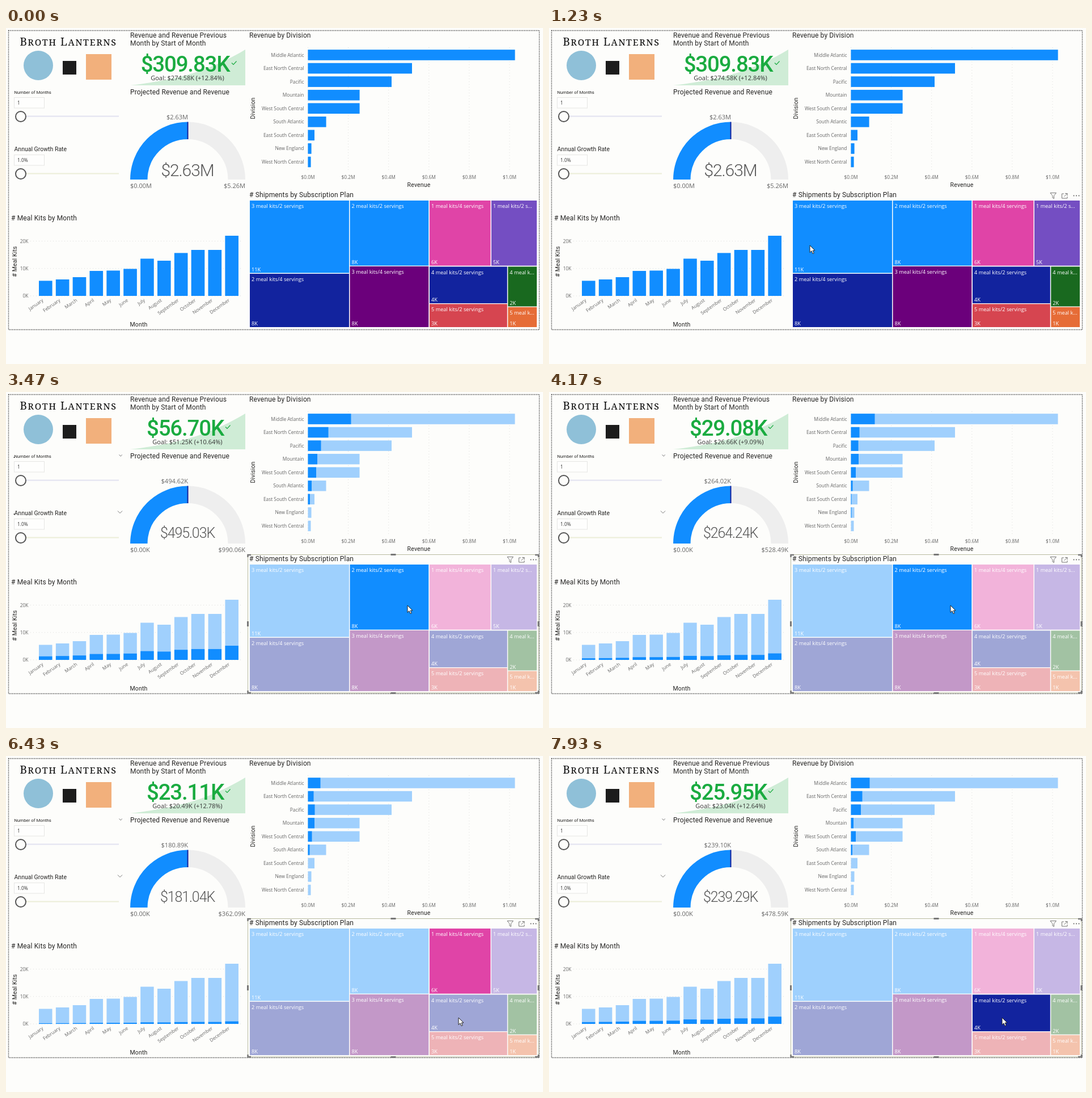
Recreate the animation shown at these times as an HTML page. Size 947 by 592 pixels, loop 8 s.

```html
<!DOCTYPE html>
<html lang="en">
<head>
<meta charset="utf-8">
<title>Meal kit dashboard</title>
<style>
  html, body { margin: 0; width: 100%; height: 100%; overflow: hidden; background: #fdfdfb; }
  svg { display: block; width: 100%; height: 100%; }
  text { font-family: "Open Sans", "Noto Sans", sans-serif; font-size: 8.4px; fill: #666; }
  .title, .axis, .small, .medium, .kpi, .total { font-family: Roboto, sans-serif; fill: #252423; }
  .title { font-size: 12px; letter-spacing: .15px; }
  .axis { font-size: 10.5px; letter-spacing: .15px; }
  .small { font-size: 7.8px; }
  .medium { font-size: 10.5px; }
  .brand { font: 19px "Noto Serif", serif; font-variant: small-caps; letter-spacing: 1.5px; fill: #111; }
  .kpi { font-size: 38.5px; font-weight: 500; letter-spacing: -1.2px; fill: #1aab40; }
  .goal { font-size: 11px; fill: #333; }
  .gauge { font-size: 11px; }
  .total { font-weight: 300; letter-spacing: -1.1px; fill: #555; }
  .tile { font-size: 9.2px; fill: #fff; }
</style>
</head>
<body>
<svg viewBox="0 0 947 592"><g id="fixed"></g><g id="live"></g></svg>
<script>
const LOOP = 8000;
const BLUE = '#118dff', NAVY = '#12239e', PALE = '#a0d0fd';

const divisions = [
  ['Middle Atlantic', 365], ['East North Central', 183.5], ['Pacific', 147.5],
  ['Mountain', 91], ['West South Central', 91], ['South Atlantic', 32],
  ['East South Central', 11.5], ['New England', 6], ['West North Central', 5]
];
const months = [
  ['January', 26.5], ['February', 29], ['March', 33], ['April', 44], ['May', 44.5], ['June', 47.5],
  ['July', 65.5], ['August', 62], ['September', 75.5], ['October', 81], ['November', 81], ['December', 106]
];
// label, value, colour, left, top, right, bottom
const tiles = [
  ['3 meal kits/2 servings', '11K', BLUE, 430, 304, 605, 431.5],
  ['2 meal kits/2 servings', '8K', BLUE, 606.5, 304, 745.3, 418.7],
  ['1 meal kits/4 servings', '6K', '#e044a7', 747, 304, 854.5, 418.7],
  ['1 meal kits/2 s...', '5K', '#744ec2', 856, 304, 936, 418.7],
  ['2 meal kits/4 servings', '8K', NAVY, 430, 433, 605, 527],
  ['3 meal kits/4 servings', '8K', '#6b007b', 606.5, 420, 745.3, 527],
  ['4 meal kits/2 servings', '4K', NAVY, 747, 420.5, 883.8, 485],
  ['5 meal kits/2 servings', '3K', '#d64550', 747, 486.3, 883.8, 527],
  ['4 meal k...', '2K', '#19691f', 885.3, 420.5, 936, 490.5],
  ['5 meal k...', '1K', '#e66c37', 885.3, 491.8, 936, 527]
];
// Each selection: click time, tile, card texts, highlighted share of months, highlighted division widths
const selections = [
  { at: -2000, tile: -1, kpi: '$309.83K', goal: '$274.58K (+12.84%)', target: '$2.63M', total: '$2.63M',
    min: '$0.00M', max: '$5.26M', share: 1, widths: divisions.map(d => d[1]) },
  { at: 1300, tile: 0, kpi: '$56.70K', goal: '$51.25K (+10.64%)', target: '$494.62K', total: '$495.03K',
    min: '$0.00K', max: '$990.06K', share: .25, widths: [76, 36, 23, 16.5, 14.5, 6.5, 3.5, 0, 0] },
  { at: 3160, tile: 1, kpi: '$29.08K', goal: '$26.66K (+9.09%)', target: '$264.02K', total: '$264.24K',
    min: '$0.00K', max: '$528.49K', share: .108, widths: [42, 15, 13, 13.5, 8.5, 3, 1, 1, 0] },
  { at: 5250, tile: 2, kpi: '$23.11K', goal: '$20.49K (+12.78%)', target: '$180.89K', total: '$181.04K',
    min: '$0.00K', max: '$362.09K', share: .042, widths: [22, 10, 12, 11.5, 7, 3, 0, 0, 0] },
  { at: 6680, tile: 6, kpi: '$25.95K', goal: '$23.04K (+12.64%)', target: '$239.10K', total: '$239.29K',
    min: '$0.00K', max: '$478.59K', share: .12, widths: [33, 20, 17.5, 4.5, 8.5, 2.5, 0, 0, 0] }
];
const pointerPath = [
  [500, 0, 345], [1100, 460, 383], [1300, 460, 383], [1600, 472, 382], [2500, 472, 382], [3100, 708, 376],
  [4200, 708, 376], [4900, 818, 370], [5500, 818, 370], [6200, 798, 461], [8000, 799, 461]
];

const rect = (x, y, w, h, fill, more = '') =>
  `<rect x="${x}" y="${y}" width="${w}" height="${h}" fill="${fill}" ${more}/>`;
const path = (d, stroke, width = 1, more = '') =>
  `<path d="${d}" fill="none" stroke="${stroke}" stroke-width="${width}" ${more}/>`;
const text = (x, y, str, cls = '', anchor = 'start', more = '') =>
  `<text x="${x}" y="${y}" class="${cls}" text-anchor="${anchor}" ${more}>${str}</text>`;
const turned = (x, y, angle) => `transform="rotate(${angle} ${x} ${y})"`;

const clamp = v => Math.min(1, Math.max(0, v));
const mix = (a, b, p) => a + (b - a) * p;
const cubic = p => p < .5 ? 4 * p ** 3 : 1 - 4 * (1 - p) ** 3;
const smooth = p => p * p * (3 - 2 * p);

const rowY = i => 47.5 + 23.56 * i;
const monthX = i => 58 + 29.86 * i;

function slicer(y, label, cls, value, track) {
  return text(14.5, y + 3, label, cls) +
    rect(14.5, y + 10, 53, 18.5, '#fefefd', 'stroke="#e6e6e4"') +
    text(20, y + 22.5, value, '', 'start', 'style="fill:#333"') +
    path(`M36 ${y + 43}H199`, track, 2) +
    `<circle cx="26" cy="${y + 43.5}" r="9" fill="#fdfdfb" stroke="#555" stroke-width="2"/>`;
}

function fixedParts() {
  let s = rect(4.5, 4.5, 936, 527, 'none', 'stroke="#444" stroke-width="1.4" stroke-dasharray="1.5 1.5"');
  s += text(110, 31, 'Broth Lanterns', 'brand', 'middle');
  s += '<circle cx="57" cy="66" r="26" fill="#8fc0d8"/>' +
    rect(100, 58, 24, 24, '#1c1c1c') + rect(141, 46, 45, 45, '#f2b07c');
  s += slicer(112.5, 'Number of Months', 'small', '1', '#e2e2f0');
  s += slicer(213.5, 'Annual Growth Rate', 'medium', '1.0%', '#eceed8');

  s += text(219, 17, 'Revenue and Revenue Previous', 'title') + text(219, 31, 'Month by Start of Month', 'title');
  s += '<path d="M219 101C300 91 355 78 422 38V101Z" fill="#cfecd6"/>';
  s += text(219, 116.5, 'Projected Revenue and Revenue', 'title');
  s += path('M320.5 180.8A86.2 86.2 0 0 1 406.7 267', '#eee', 30.5) +
    path('M234.3 267A86.2 86.2 0 0 1 320.5 180.8', BLUE, 30.5) + path('M320.5 165.5V196', NAVY, 2);

  s += text(429, 17, 'Revenue by Division', 'title');
  for (let i = 0; i < 6; i++) {
    const x = 532.5 + 71.1 * i;
    s += path(`M${x} 34V250`, '#dcdcda', 1, 'stroke-dasharray="1 4"');
    s += text(x, 266, `$${(i / 5).toFixed(1)}M`, '', 'middle');
  }
  divisions.forEach(([name], i) => s += text(525.5, rowY(i) + 3, name, '', 'end'));
  s += text(728, 280, 'Revenue', 'axis', 'middle') + text(439, 141.5, 'Division', 'axis', 'middle', turned(439, 141.5, -90));

  s += text(9, 338.5, '# Meal Kits by Month', 'title');
  ['0K', '10K', '20K'].forEach((label, i) => {
    const y = 472 - 48.25 * i;
    s += text(39.5, y + 3, label, '', 'end') + path(`M43 ${y}H418`, '#dcdcda', 1, 'stroke-dasharray="1 4"');
  });
  months.forEach(([name], i) => {
    const x = monthX(i) + 8.5;
    s += text(x, 481, name, '', 'end', turned(x, 481, -35));
  });
  s += text(234, 525.5, 'Month', 'axis', 'middle') + text(19, 411.5, '# Meal Kits', 'axis', 'middle', turned(19, 411.5, -90));
  return s + text(429, 298, '# Shipments by Subscription Plan', 'title');
}

function cards(d) {
  const tick = d.kpi.length > 7 ? 402 : 391;
  return text(316, 76.5, d.kpi, 'kpi', 'middle') +
    path(`M${tick - 4} 61.5l3 3 5.5-6`, '#1aab40', 1.2) +
    text(320, 91.5, 'Goal: ' + d.goal, 'goal', 'middle') +
    text(321, 161, d.target, 'gauge', 'end') +
    text(219, 282, d.min, 'gauge') + text(422, 282, d.max, 'gauge', 'end') +
    (d.total.length > 6
      ? text(320, 257, d.total, 'total', 'middle', 'style="font-size:25px"')
      : text(320, 260.5, d.total, 'total', 'middle', 'style="font-size:30px"'));
}

function treemap(selected) {
  return tiles.map(([label, value, fill, l, t, r, b], i) => {
    const faded = selected >= 0 && selected !== i;
    return rect(l, t, r - l, b - t, fill, faded ? 'opacity=".4"' : '') +
      text(l + 3, t + 13, label, 'tile') + text(l + 3, b - 3, value, 'tile');
  }).join('');
}

function headerIcons() {
  return path('M884 290.5H894.5L890.5 295.5V300.5L888 299V295.5Z', '#777') +
    path('M908 292H904.5V300H914V297M910 291.5H914V295.5M914 291.5L908.5 297', '#777') +
    [925.5, 930, 934.5].map(x => rect(x - .8, 294.6, 1.7, 1.7, '#555')).join('');
}

function selectionFrame() {
  return rect(426.5, 286.5, 512.5, 243.5, 'none', 'stroke="#b9bba0"') +
    path('M426.5 291V287H432M933 287H939V291M426.5 526V530H432M933 530H939V526', '#777', 2.5) +
    path('M678.5 286.5H687.5M678.5 530.5H687.5M426.5 404V413M939 404V413', '#777', 3);
}

function pointerAt(t) {
  const i = pointerPath.findIndex(k => k[0] > t);
  if (i < 1) return null;
  const [t0, x0, y0] = pointerPath[i - 1], [t1, x1, y1] = pointerPath[i];
  const p = smooth((t - t0) / (t1 - t0));
  return [mix(x0, x1, p), mix(y0, y1, p)];
}

function liveParts(t) {
  const index = selections.findLastIndex(s => s.at <= t);
  const now = selections[index], before = selections[Math.max(0, index - 1)];
  const since = t - now.at;
  const ease = delay => cubic(clamp((since - delay) / 500));
  const share = mix(before.share, now.share, ease(164));
  const growth = ease(320);

  let s = cards(since < 360 ? before : now);
  divisions.forEach(([, width], i) => {
    const y = rowY(i) - 9.25;
    s += rect(532.5, y, width, 18.5, PALE) +
      rect(532.5, y, mix(before.widths[i], now.widths[i], growth), 18.5, BLUE);
  });
  months.forEach(([, height], i) => {
    const lit = height * share;
    s += rect(monthX(i), 472 - height, 23.5, height, PALE) + rect(monthX(i), 472 - lit, 23.5, lit, BLUE);
  });
  s += treemap(now.tile);

  if (index > 0) {
    s += selectionFrame() + path('M199.5 110.5l2.7 2.7 2.7-2.7M197 209.5l4 4 4-4', '#777');
    // Loading dots slide past the slicer titles.
    if (since > 260 && since < 440) {
      const x = 13.5 + Math.max(0, since - 320) * 1.5;
      s += rect(x, 114.5, 1.5, 1.5, '#333') + rect(x, 214.5, 1.5, 1.5, '#333');
    }
  }
  const pointer = pointerAt(t);
  if (pointer) {
    if (pointer[0] > 427) s += headerIcons();
    s += `<path transform="translate(${pointer})" d="M0 0V12.5L3 9.7 5 14.5 7.2 13.6 5.2 9H9Z" fill="#fff" stroke="#222" stroke-width="1"/>`;
  }
  return s;
}

const live = document.getElementById('live');
document.getElementById('fixed').innerHTML = fixedParts();
function draw() {
  live.innerHTML = liveParts(performance.now() % LOOP);
  requestAnimationFrame(draw);
}
draw();
</script>
</body>
</html>
```
